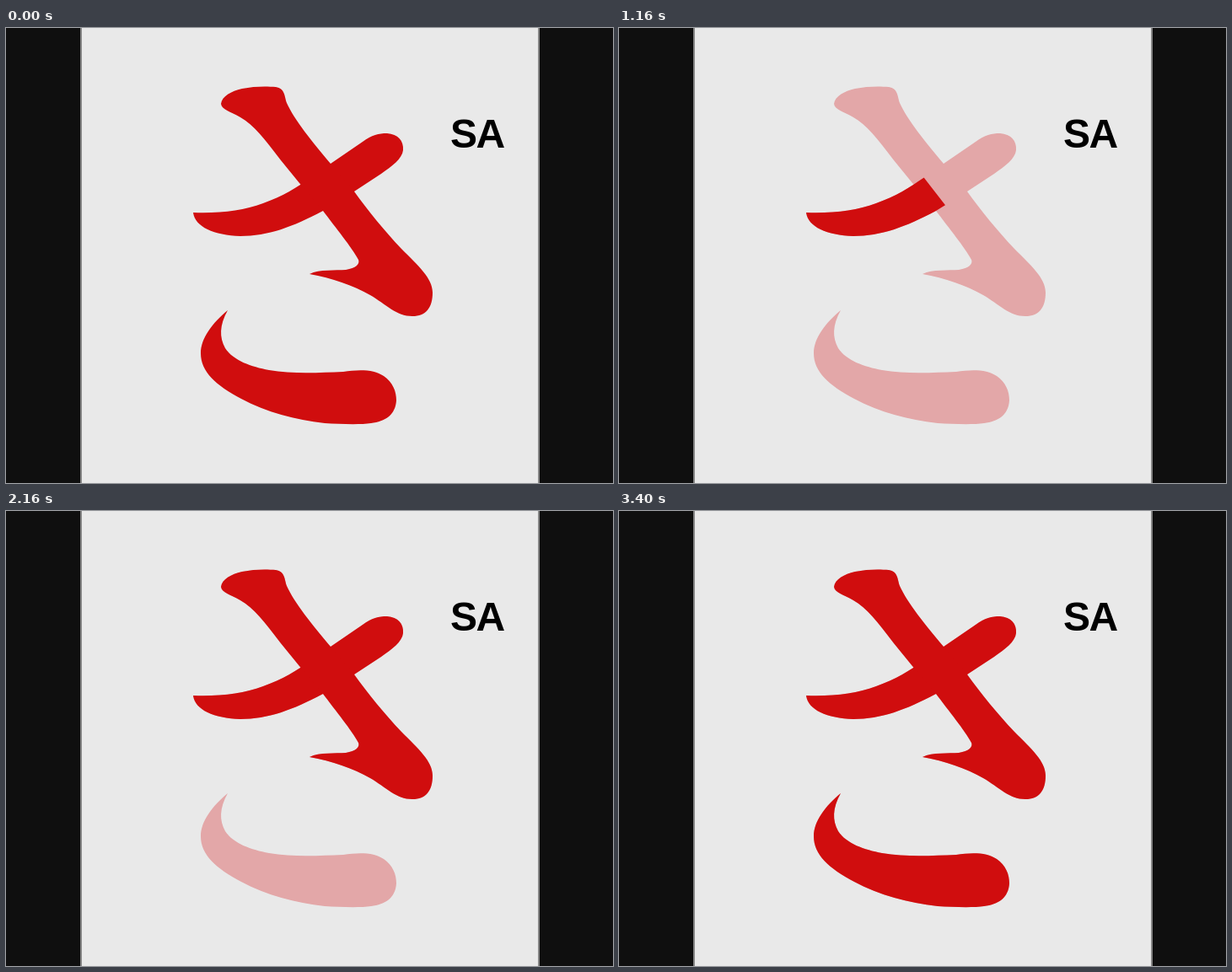
Recreate the animation shown at these times as an HTML page with a canvas. Size 720 by 540 pixels, loop 3.52 s.

```html
<!DOCTYPE html>
<html lang="en">
<head>
<meta charset="utf-8">
<title>Stroke order: SA</title>
<style>
  html, body { margin: 0; width: 100%; height: 100%; overflow: hidden; background: #0f0f0f; }
  canvas { display: block; }
</style>
</head>
<body>
<canvas id="stage" width="720" height="540"></canvas>
<script>
const LOOP = 3520, STEP = 40, CLEAR = 800;
const PAPER = '#e9e9e9', BAR = '#0f0f0f', EDGE = '#858585';
const RED = '#d00d0e', PALE = '#e3a7a8';
const ctx = document.getElementById('stage').getContext('2d');

// Length of a centre line given as path data.
function pathLength(d) {
  const el = document.createElementNS('http://www.w3.org/2000/svg', 'path');
  el.setAttribute('d', d);
  return el.getTotalLength();
}

function makeStroke(start, dur, outline, spine) {
  return { start, dur, shape: new Path2D(outline), spine: new Path2D(spine), len: pathLength(spine) };
}

const strokes = [
  makeStroke(840, 549,
    `M222 219 C255 220 281 217 305 208 C328 200 345 189 361 178 L385 161
     L423 135 C434 127 442 125 452 125 C465 126 472 134 471 145
     C470 155 458 164 445 173 L413 194 L376 217
     C340 236 311 247 278 247 C247 246 224 236 222 219 Z`,
    'M216 231 C290 240 335 224 373 194 C400 173 445 145 474 128'),
  makeStroke(1440, 678,
    `M255 90 C256 81 267 75 280 72 C294 69 309 69 320 70 C331 72 330 80 333 89
     C342 109 364 136 385 161 L413 194 C429 216 449 241 469 262
     C489 282 506 297 506 314 C506 332 498 342 482 342
     C463 342 451 328 432 317 C411 305 387 297 360 292
     C372 286 391 288 403 287 C415 285 420 280 418 275
     C410 260 391 237 376 217 L348 184 L326 157 C307 132 294 115 278 106
     C266 99 256 97 255 90 Z`,
    'M285 62 C305 85 333 125 345 147 C365 184 440 262 478 308 L352 289'),
  makeStroke(2200, 600,
    `M263 335 C253 353 253 367 260 380 C270 395 291 402 312 406
     C340 411 372 409 400 408 C418 405 437 405 448 413 C459 421 463 431 463 442
     C462 459 450 467 433 469 C420 471 395 470 378 469
     C343 465 309 456 279 440 C249 424 231 408 231 386 C231 368 245 350 263 335 Z`,
    'M264 330 C232 375 240 400 275 418 C315 438 360 442 406 439 L470 434')
];

function fill(shape, color) {
  ctx.fillStyle = color;
  ctx.fill(shape);
}

// Red ink up to share p of the centre line, cut square to it.
function ink(s, p) {
  if (p <= 0) return;
  if (p >= 1) return fill(s.shape, RED);
  ctx.save();
  ctx.clip(s.shape);
  ctx.lineWidth = 88;
  ctx.lineJoin = 'round';
  ctx.strokeStyle = RED;
  ctx.setLineDash([s.len * p, s.len * 2]);
  ctx.stroke(s.spine);
  ctx.restore();
}

function drawStage() {
  ctx.fillStyle = BAR;
  ctx.fillRect(0, 0, 720, 540);
  ctx.fillStyle = EDGE;
  ctx.fillRect(88, 0, 545, 540);
  ctx.fillStyle = PAPER;
  ctx.fillRect(90, 0, 541, 540);
  ctx.fillStyle = '#000';
  ctx.font = 'bold 48px "Liberation Sans", Arial, sans-serif';
  ctx.letterSpacing = '-1.5px';
  ctx.fillText('SA', 527, 142);
}

function draw(t) {
  drawStage();
  const waiting = t >= CLEAR;
  if (waiting) strokes.forEach(s => fill(s.shape, PALE));
  strokes.forEach(s => ink(s, waiting ? (t - s.start) / s.dur : 1));
}

const begin = performance.now();
function tick() {
  const t = (performance.now() - begin) % LOOP;
  draw(Math.floor(t / STEP) * STEP);
  requestAnimationFrame(tick);
}
tick();
</script>
</body>
</html>
```
